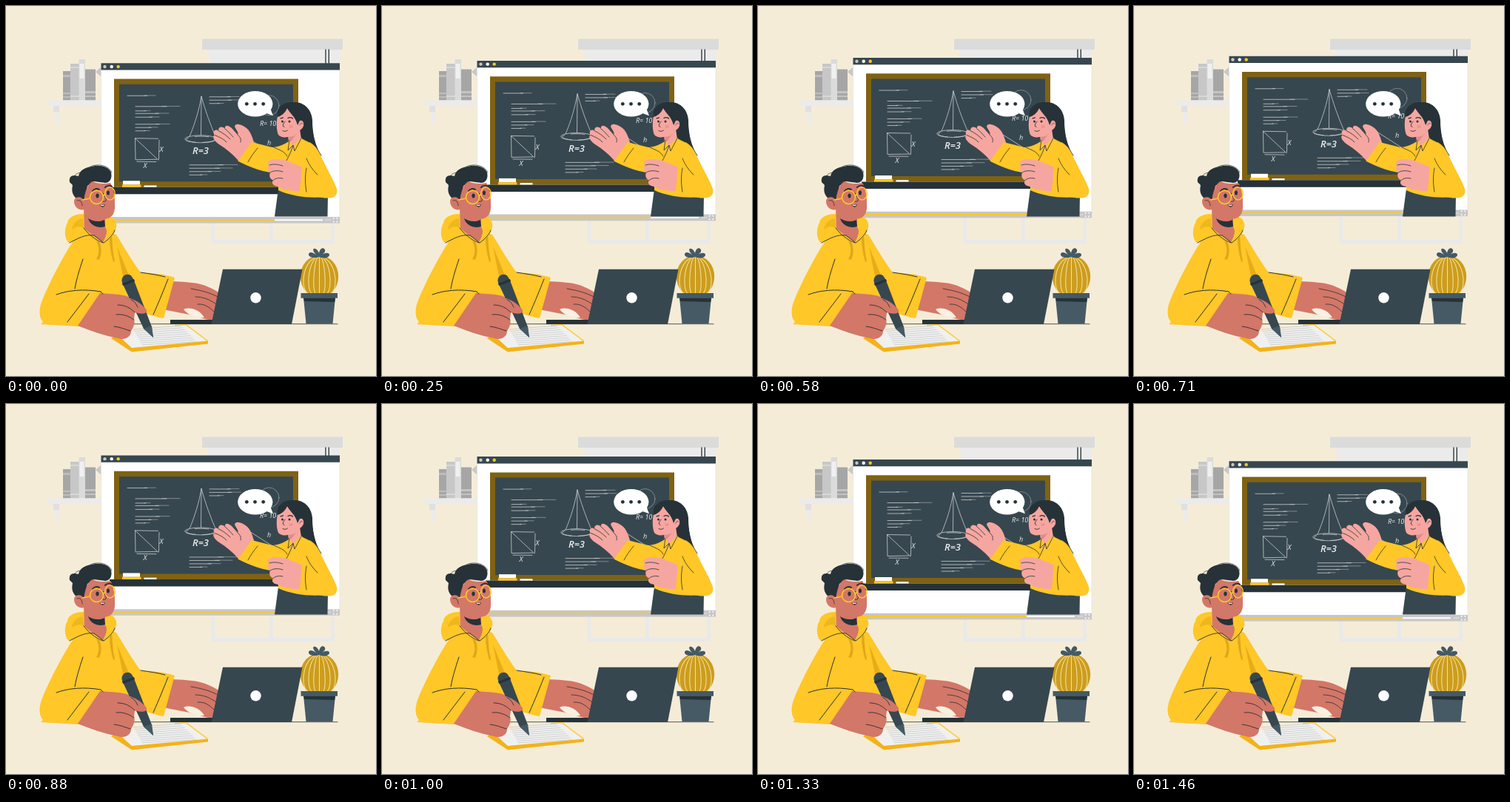
Recreate the animation shown at these times as an HTML page. Size 500 by 500 pixels, loop 1500 ms.

```html
<!DOCTYPE html>
<html lang="en">
<head>
<meta charset="utf-8">
<title>Online lesson</title>
<style>
  html, body { margin: 0; width: 100%; height: 100%; overflow: hidden; background: #f5ecd8; }
  svg { display: block; width: 100vw; height: 100vh; }
  .dark { fill: #263238; }
  .slate { fill: #37474f; }
  .yel { fill: #ffc727; }
  .pink { fill: #f6a6a0; }
  .skin { fill: #d37768; }
  .ink { fill: none; stroke: #263238; stroke-linecap: round; stroke-linejoin: round; }
  .chalk { fill: none; stroke: #eceeee; stroke-linecap: round; opacity: .8; }
  text { fill: #eceeee; font-family: "Open Sans", Lato, sans-serif; font-style: italic; }
</style>
</head>
<body>
<svg viewBox="0 0 500 500">
  <rect width="500" height="500" fill="#f5ecd8"/>

  <!-- shelf and books -->
  <g>
    <path d="M77 88h10v39.500h-10z" fill="#a6a6a6"/>
    <path d="M77 93h10v3h-10zM77 117h10v2h-10zM77 122h10v2h-10z" fill="#bdbdbd"/>
    <path d="M87 78h12v49.500h-12z" fill="#c7c7c7"/>
    <path d="M87 82h12v2h-12zM87 121h12v2h-12z" fill="#d8d8d8"/>
    <path d="M98.500 72h8.500v55.500h-8.500z" fill="#dbdbdb"/>
    <path d="M99.500 78h6v20h-6z" fill="#f0f0f0"/>
    <path d="M107 85.500h14v42h-14z" fill="#a6a6a6"/>
    <path d="M107 115h14v3h-14zM107 121h14v2h-14z" fill="#c4c4c4"/>
    <path d="M56 127.500h73v7.500h-73z" fill="#ebebeb"/>
    <path d="M64 135h8v8h-8z" fill="#e0e0e0"/>
    <path d="M66 143h5.500v17l-5.500-3z" fill="#ebebeb"/>
    <path d="M121 89l8-7v14z" fill="#c7c7c7"/>
  </g>

  <!-- roller and wall frame -->
  <path d="M272 59H451V90H279Z" fill="#ebebeb"/>
  <path d="M265 44.500h190v14.500h-190z" fill="#dbdbdb"/>
  <path d="M432 59V90M436.300 59V90" class="ink" stroke-width="1.300"/>
  <path d="M280 270V318.500H441.500V270M358.500 270V318" fill="none" stroke="#e9e9e9" stroke-width="5"/>

  <!-- moving screen -->
  <g id="screen">
    <path d="M128.500 80H451V293H128.500Z" fill="#fff" stroke="#e2e2e2" stroke-width=".7"/>
    <path d="M128.500 77H451V86.300H128.500Z" class="slate"/>
    <circle cx="133.500" cy="81.700" r="2.200" fill="#c7c7c7"/>
    <circle cx="142.700" cy="81.700" r="2.200" fill="#fff"/>
    <circle cx="151.700" cy="81.700" r="2.200" class="yel"/>
    <path d="M128.500 284.700H451V293.300H128.500Z" fill="#c7c7c7"/>
    <path d="M140 288.900H363" stroke="#ffc727" stroke-width="2"/>
    <path d="M363 288.900H428" stroke="#fff" stroke-width="2"/>
    <path d="M432 289H439" stroke="#eee" stroke-width="1.300" stroke-dasharray="1.300 1.300"/>
    <path d="M442.300 288V286.300H444M446 286.300H447.700V288M447.700 290V291.700H446M444 291.700H442.300V290" fill="none" stroke="#fff"/>

    <path d="M146 98.300H395V244.500H146Z" fill="#7f6213"/>
    <path d="M153 105.500H388V237H153Z" class="slate"/>
    <path d="M140 244.500H368V254H140Z" class="dark"/>
    <path d="M158 236H181V241.300H158Z" fill="#fff"/>
    <path d="M157 241.300H182.500V244.500H157Z" class="yel"/>
    <path d="M186.500 242.200H203.500V244.500H186.500Z" fill="#fff"/>

    <g id="notes" stroke-width=".8"></g>
    <g class="chalk" stroke-width=".8">
      <path d="M174.500 178.500L205.500 179M174.500 178.500L175 207.500 204 207M175 179L206 208M207 181L206.500 207M177 210L203 210.300"/>
      <path d="M264 122L263.500 174M264 122C261 140 255 160 248 176M264 122C269 140 276 160 284 178"/>
      <ellipse cx="263.300" cy="179.500" rx="21.500" ry="5"/>
      <ellipse cx="263" cy="180" rx="19.500" ry="4.200" stroke-dasharray="18 9"/>
      <circle cx="355.500" cy="134" r="13.500" opacity=".6"/>
      <path d="M328 179L364 202"/>
    </g>
    <text x="252" y="200" font-size="13" font-weight="600">R=3</text>
    <text x="343" y="161.500" font-size="9">R= 10</text>
    <text x="353" y="187.500" font-size="9">h</text>
    <text x="207.500" y="197" font-size="9.500">X</text>
    <text x="185.500" y="219" font-size="9.500">X</text>
  </g>

  <!-- speech bubble -->
  <path d="M352 145L361 148.300 357 138Z" fill="#fff"/>
  <ellipse cx="336.800" cy="132.300" rx="23.600" ry="17.300" fill="#fff"/>
  <g class="dark">
    <circle cx="325.300" cy="132.300" r="2.400"/>
    <circle cx="336.500" cy="132.300" r="2.400"/>
    <circle cx="347.700" cy="132.300" r="2.400"/>
  </g>

  <!-- teacher -->
  <g>
    <path d="M367 148C365 137 376 129 388 130C403 129 413 140 414 154C414 172 417 186 424 200L405 202 385 180Z" class="dark"/>
    <path d="M413 160C415 180 419 192 426 202" class="ink"/>
    <path d="M368 247L435 255 434.500 284.500H363Z" class="slate"/>
    <path d="M385 181C378 186 371 190 360 191L332 184 313.500 209.500C330 218 350 226 369 226L368 249C388 258 412 260 432 258L420 194C416 186 407 183 399 179Z" class="yel"/>
    <path d="M381 174L397 166 399 180 385 195 382 184Z" class="pink"/>
    <path d="M382 177C388 177 392 174 394 171L385 183Z" fill="#e08a86"/>
    <path d="M383 181L381 195 388 189 390 201 406 186 399 178 387 190Z" class="yel"/>
    <path d="M383 181L381 195 388 188 390 196 399 179M388 189C383 202 378 212 374 216M362 191C370 195 376 196 380 203" class="ink" stroke-width=".8"/>
    <path d="M368 146C365 153 365 168 368 174C373 180 386 178 393 169C399 169 404 162 402 157C400 153 396 154 394 158L393 147 378 137Z" class="pink"/>
    <path d="M366 150C372 149 377 145 380 138C384 146 391 149 394 161L397 155C401 153 403 158 403 164L411 162 410 142C400 130 372 128 366 150Z" class="dark"/>
    <path d="M397 161C398 158 400 158 401 159" class="ink" stroke-width=".7"/>
    <path d="M377 156C374 160 373 163 376 163.500M374 168.500C376 170 379 169.500 380.500 168" class="ink" stroke-width=".9"/>
    <path d="M371 151.800L374.500 150.800M381 151.500C383 150 386 150.500 387.500 152" class="ink" stroke-width="1.300"/>
    <circle cx="373.500" cy="156" r="1.500" class="dark"/>
    <circle cx="383" cy="156" r="1.500" class="dark"/>
    <ellipse cx="385" cy="163" rx="2.600" ry="2" fill="#f0918c"/>

    <path d="M314 209C306 200 298 193 288 187C281 182 278.500 177 281.500 174.500C279 169 283 166 287 168.500C287 163 292 162 296 166C295 160 301 161 305 165L313 174C315 172 311 167 309 163C310 157 319 160 325 165C331 170 333 178 335 184Z" class="pink"/>
    <path d="M282 174.500C289 177 294 180 298 184M287 168.500C294 172 299 176 303 180M296 166C301 170 304 174 307 177M313 174C317 177 318 181 317 184" class="ink" stroke-width=".8"/>
    <path d="M332 184L336 185 319 212 313.500 209.500Z" class="yel"/>
    <path d="M340 192C335 198 330 205 327 211" class="ink" stroke-width=".8"/>

    <path d="M403 219C388 212 375 206 364 207C356 207 351 212 355.500 215C353 219 354 223 357 225C355 230 357 234 361 235.500C358 240 362 243 366 243.500C376 249 388 251 400 250Z" class="pink"/>
    <path d="M356 215C362 213 368 214 374 216M357 225C362 222 368 222 374 224M361 235.500C365 232 370 232 374 233" class="ink" stroke-width=".8"/>
    <path d="M410 184C418 188 423 196 427 206C435 222 444 238 447 247C449 257 443 260 431 259.500C418 258 407 254 397 250L400 217 411 221 405 200Z" class="yel"/>
    <path d="M406 219C404 230 404 240 406 251M406 206C409 213 412 219 421 228" class="ink" stroke-width=".8"/>
  </g>

  <!-- desk and notebook -->
  <path d="M97 429.700H448" class="ink" stroke-width=".8"/>
  <path d="M147 444L243 431 273 454.500 170 464.500Z" fill="#f0f0ef"/>
  <path d="M142 449L150 444 170 462 273 452.500V456.500L170 467.500Z" fill="#f3b318"/>
  <path d="M228 432L243 430.500 273 453" fill="none" stroke="#ffc727" stroke-width="1.300"/>
  <path id="page" fill="none" stroke="#c3c6c7" stroke-width=".7"/>

  <!-- cactus -->
  <ellipse cx="423.500" cy="365.500" rx="25.700" ry="28.500" fill="#cc9d1d"/>
  <g id="ribs" fill="none"></g>
  <path d="M423 339C416 342 408 339 409 335C411 331 416 334 419 336C414 331 414 327 418 328C421 329 422 332 423 334C424 329 427 326 430 328C433 331 430 334 427 336C433 332 438 334 437 337C434 342 428 341 423 339Z" fill="#455a64"/>
  <path d="M402 394H445L441.500 429.300H405.500Z" fill="#455a64"/>
  <path d="M402 394.500H445L444.200 400 403 399Z" class="dark"/>
  <path d="M398.500 388H448V394.700H398.500Z" fill="#455a64"/>

  <!-- student -->
  <g>
    <path d="M218 372C232 372 247 373 259 375C272 378 282 383 290 389L286 424C274 425 266 423 258 419L212 410Z" class="skin"/>
    <path d="M240 410C249 406 262 411 268 421C258 422 246 418 240 410Z" fill="#f8f1e1"/>
    <path d="M250 382C262 384 275 387 286 393M256 393C267 393 276 397 284 403M259 403C268 402 275 407 281 413" class="ink" stroke-width=".8"/>

    <path d="M92 316C79 335 61 369 50 395C45 406 43 419 50 427L47 430 98 433 128 389 157 401C174 411 195 419 213 422L228 367C213 362 198 361 182 360C169 343 160 326 149 309L120 298Z" class="yel"/>
    <path d="M104 281C94 281 84 285 83 293C78 302 79 316 85 320C96 317 111 312 120 310L133 321C142 314 151 303 149 294C147 286 141 284 134 284Z" class="yel"/>
    <path d="M104 287C96 288 90 294 89 302C95 298 100 297 106 300Z" fill="#efb71f"/>
    <path d="M105 273L134 283V299C137 302 137 309 131 319C120 312 110 305 106 300Z" class="skin"/>
    <path d="M111 287C118 292 127 292 133 289L134 298C125 301 114 297 111 287Z" class="dark"/>
    <path d="M86 320C97 314 108 308 119 310L132 320C139 315 145 309 147 303M105 300C111 308 120 316 131 320" class="ink" stroke-width=".9"/>
    <path d="M122 317C126 326 127 334 122 342L126 343C130 334 129 325 126 318ZM140 314C140 325 142 335 145 346L147 345C144 332 144 322 143 311Z" fill="#dfa719"/>
    <path d="M150 325L167 366 159 370Z" fill="#e7ac18"/>

    <path d="M86 238C85 231 88 227 98 230C99 223 106 218 116 217C124 214 139 216 142 225C144 233 140 239 134 239L119 237 110 243 106 262 96 261C88 254 89 248 90 242Z" class="dark"/>
    <path d="M90 234C93 226 98 225 104 225M114 217C125 212 140 216 143 225" class="ink" stroke-width=".7"/>
    <path d="M105 263C103 256 92 257 92 264C92 271 98 277 106 275C112 285 122 289 133 288C145 287 148 278 147 266C147 255 145 245 141 239C132 241 122 240 117 237C109 241 107 252 105 263Z" class="skin"/>
    <path d="M96 263C100 261 103 265 103 270" class="ink" stroke-width=".8"/>
    <path d="M117 250C119 247 123 246 126 248M134 245C137 242 141 242 143 244" class="ink" stroke-width="2"/>
    <ellipse cx="123.500" cy="256.500" rx="2.100" ry="3" class="dark"/>
    <ellipse cx="138" cy="252.500" rx="2" ry="2.900" class="dark"/>
    <path d="M131 253C134 258 137 262 134 264C132 265 130 264 130 263" class="ink"/>
    <path d="M126 267C128 269 131 269.500 134 268C133 273 128 273 126 267Z" class="dark"/>
    <path d="M127 268C129 269.300 131 269.400 133 268.700L132 270.300 128.500 270Z" fill="#fff"/>
    <g fill="none" stroke="#ffc727" stroke-width="1.500">
      <circle cx="122.500" cy="258.500" r="9"/>
      <ellipse cx="140.500" cy="253.500" rx="6.700" ry="8.500"/>
      <path d="M103 262L113.500 260M131 256L134 255"/>
    </g>

    <path d="M127 388C139 389 152 389 163 392C175 397 184 402 190 411C191 417 181 417 174 414L173 423C175 430 171 435 169 439C169 448 160 452 151 449C132 445 114 439 97 432Z" class="skin"/>
    <path d="M157 374C155 367 160 362 166 363C169 363 171 367 173 371L196 431 199 448 186 436Z" class="slate"/>
    <path d="M157 375L173 369 174 372 158 378Z" class="dark"/>
    <path d="M186 436L197 432 199 448Z" fill="#455a64"/>
    <path d="M157 394C170 393 183 401 190 411C191 417 179 417 173 413L173 424C174 431 171 435 169 439L152 431 146 405Z" class="skin"/>
    <path d="M151 404C160 404 167 407 174 414M149 417C158 416 166 419 173 424M146 433C155 434 161 437 168 439M169 397C174 399 176 403 178 407" class="ink" stroke-width=".9"/>

    <path d="M104 342C99 357 95 370 93 382M68 390C84 384 106 382 128 386M112 389L83 427M219 369C213 384 207 399 199 417M182 360C194 362 204 363 215 366M128 386L131 389" class="ink"/>
  </g>

  <!-- laptop -->
  <path d="M222 424H280V430H222Z" class="dark"/>
  <path d="M293 355.700H400.500L386 430H277.500Z" class="slate"/>
  <circle cx="337.500" cy="394.300" r="7.200" fill="#fff"/>
</svg>
<script>
const $ = id => document.getElementById(id);

// Chalk writing: x, y, length
const rows = [
  [164, 121, 38], [175, 135.500, 60], [175, 141.500, 20], [175, 145, 45], [175, 150, 32],
  [175, 159.500, 46], [175, 164, 30], [175, 168.500, 19],
  [275, 122.500, 40], [275, 127, 42], [275, 131.500, 19],
  [248, 214.500, 65], [248, 219, 58], [248, 223.500, 42], [248, 228, 24]
];
$('notes').innerHTML = rows.map(([x, y, w]) =>
  `<path class="chalk" d="M${x} ${y}h${w * .7}"/>` +
  `<path class="chalk" stroke-width=".5" d="M${x + w * .6} ${y - .3}h${w * .4}"/>`).join('');

let lines = '';
for (let i = 0; i < 9; i++) {
  lines += `M${172 + i * 1.5} ${437 + i * 2.6}l${64 + i * 1.2} -${5 - i * .1}`;
}
$('page').setAttribute('d', lines);

const rib = k =>
  `<path d="M423.500 338C${423.5 + k * 1.1} 341 ${423.5 + k * 1.35} 380 ${423.5 + k * .8} 388"` +
  ` stroke="#f3dc98" stroke-width="1.100"/>`;
$('ribs').innerHTML = [-20, -13.5, -7, 0, 7, 13.5, 20].map(rib).join('');

// The screen rises and sinks evenly, at 24 steps a second
const LOOP = 1500, STEPS = 36, BASE = .25, RISE = 9.75;
function draw(ms) {
  const last = STEPS - 1;
  const n = Math.floor((ms % LOOP) / LOOP * STEPS + .05);
  const p = Math.min(n, last - n) / (last / 2);
  $('screen').setAttribute('transform', `translate(0 ${(BASE - RISE * p).toFixed(3)})`);
}

const start = performance.now();
function tick(now) {
  draw(Math.max(0, now - start));
  requestAnimationFrame(tick);
}
draw(0);
requestAnimationFrame(tick);
</script>
</body>
</html>
```
